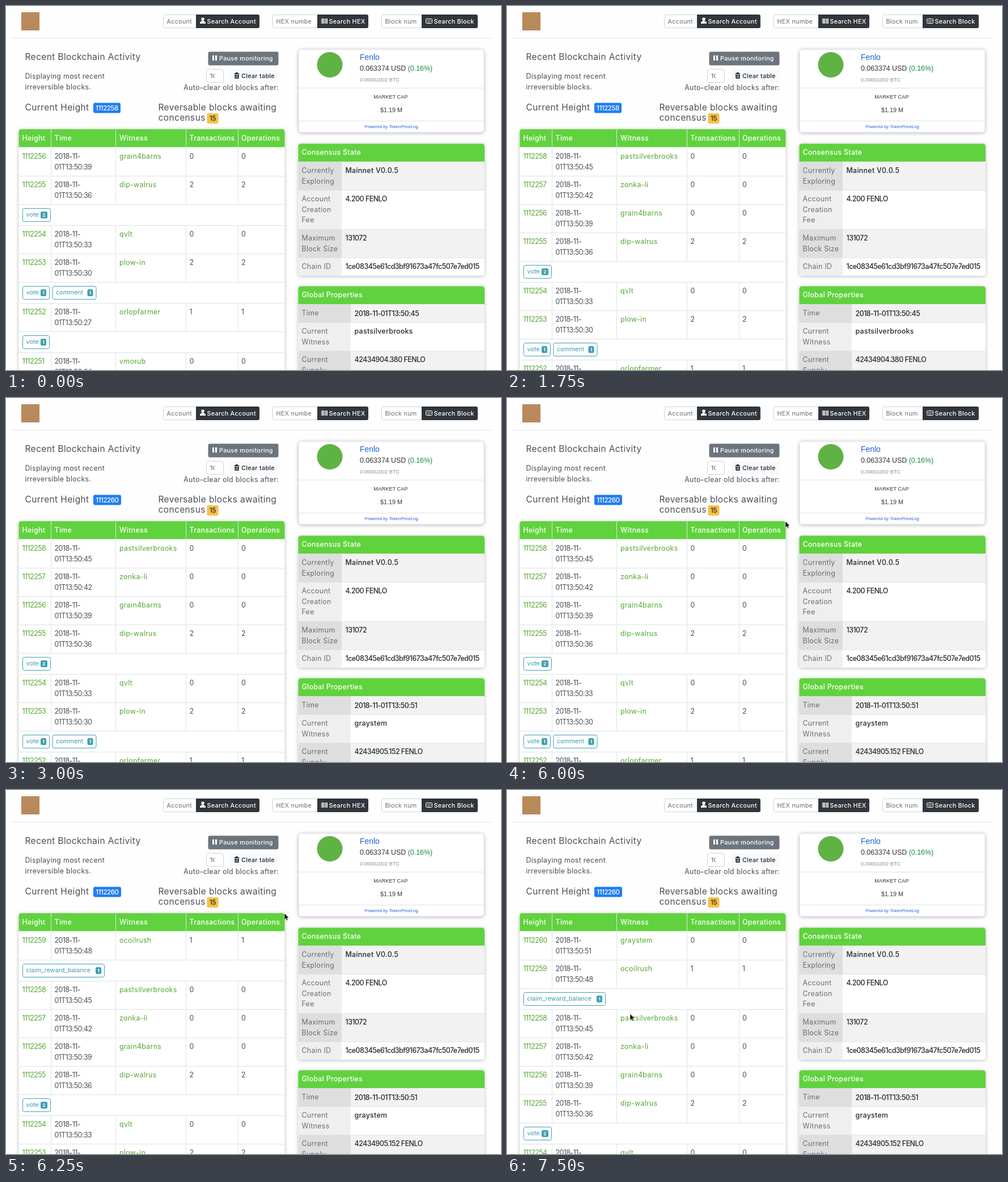
Animation of 873x641 px, one loop 8 s. Source, as an HTML page:

```html
<!DOCTYPE html>
<html lang="en">
<head>
<meta charset="utf-8">
<title>Block explorer</title>
<style>
  html, body { margin: 0; width: 100%; height: 100%; overflow: hidden; background: #fefefe; }
  svg { display: block; }
  text { font: 12.4px Inter, sans-serif; letter-spacing: .024em; fill: #4a4f55; white-space: pre; }
  .h5 { font-size: 15.5px; }
  .small { font-size: 10.85px; }
  .badge { font-size: 11.6px; }
  .count { font-size: 8.2px; font-weight: 700; }
  .medium { font-weight: 500; }
  .number { letter-spacing: -.04em; }
  .white { fill: #fff; }
  .dark { fill: #24292e; }
  .muted { fill: #676e75; }
  .green { fill: #55a632; }
  .teal { fill: #3a9bb0; letter-spacing: 0; }
  .arial { font-family: "Liberation Sans", Arial, sans-serif; letter-spacing: 0; fill: #333; }
  .card { filter: drop-shadow(0 1px 3px #0004); }
</style>
</head>
<body>
<svg id="stage" width="873" height="641" viewBox="0 0 873 641">
  <clipPath id="inCard"><path d="M515 240H844V641H515z"/></clipPath>
  <clipPath id="inField"><path d="M356 112H367.5V134H356z"/></clipPath>
  <g id="page"></g>
  <g id="rows"></g>
  <g id="state"></g>
  <path id="cursor" d="M0 0V11.5L2.6 9.2 4.4 13 6.2 12.2 4.5 8.5H8z" stroke="#fff" stroke-width=".7"/>
</svg>
<script>
const GREEN = '#60d23e', LINE = '#dee2e6', TEAL = '#3f9fb3';
const COLUMNS = [28.5, 85.5, 200, 323.5, 415];
const $ = id => document.getElementById(id);

const text = (x, y, s, cls = '', extra = '') => `<text x="${x}" y="${y}" class="${cls}" ${extra}>${s}</text>`;
const centered = (x, y, s, cls, extra = '') => text(x, y, s, cls, `text-anchor="middle" ${extra}`);
const rect = (x, y, w, h, fill, r = 0, extra = '') =>
  `<rect x="${x}" y="${y}" width="${w}" height="${h}" rx="${r}" fill="${fill}" ${extra}/>`;
const outline = (x, y, w, h, stroke, r = 3) => rect(x + .5, y + .5, w - 1, h - 1, '#fff', r, `stroke="${stroke}"`);
const path = (d, fill, extra = '') => `<path d="${d}" fill="${fill}" ${extra}/>`;
const lines = d => path(d, 'none', `stroke="${LINE}"`);
const topRounded = (x, y, w, h, r = 5) =>
  path(`M${x} ${y + h}V${y + r}q0-${r} ${r}-${r}h${w - 2 * r}q${r} 0 ${r} ${r}V${y + h}z`, GREEN);

// Newest block first
const blocks = [
  ['graystem'], ['ocoilrush', ['claim_reward_balance', 1]], ['pastsilverbrooks'], ['zonka-li'],
  ['grain4barns'], ['dip-walrus', ['vote', 2]], ['qvlt'], ['plow-in', ['vote', 1], ['comment', 1]],
  ['orlopfarmer', ['vote', 1]], ['vmorub']
].map(([witness, ...ops], i) => ({
  height: 1112260 - i, time: `01T13:50:${51 - 3 * i}`, witness, ops,
  total: ops.reduce((sum, op) => sum + op[1], 0)
}));
const labelWidth = { vote: 24, comment: 54, claim_reward_balance: 121 };

function opTags(ops, y) {
  let x = 29, out = '';
  for (const [name, count] of ops) {
    const badgeX = x + 8 + labelWidth[name], badgeW = count > 1 ? 12 : 10, w = badgeX + badgeW + 6 - x;
    out += outline(x, y + 7, w, 24, TEAL) + text(x + 6.5, y + 22, name, 'small teal') +
      rect(badgeX, y + 13, badgeW, 12, TEAL, 2.5) + centered(badgeX + badgeW / 2, y + 22, count, 'count white');
    x += w + 4.5;
  }
  return out;
}

function blockRows(newest) {
  let y = 249, out = '';
  for (const b of blocks.filter(b => b.height <= newest)) {
    if (y > 641) break;
    const [height, time, witness, transactions, operations] = COLUMNS;
    out += text(height, y + 20, b.height, 'number green') + text(time, y + 20, '2018-11-', 'number') +
      text(time, y + 38.6, b.time, 'number') + text(witness, y + 20, b.witness, 'green') +
      text(transactions, y + 20, b.total) + text(operations, y + 20, b.total) +
      lines(`M79.5 ${y}v50M193.5 ${y}v50M317.5 ${y}v50M409.5 ${y}v50M23 ${y + 50.5}h468`);
    y += 50;
    if (b.ops.length) {
      out += opTags(b.ops, y) + lines(`M23 ${y + 37.5}h468`);
      y += 37;
    }
  }
  return out;
}

function searchBox(x, split, right, hint, label, textX, icon) {
  return outline(x, 15, split - x + 3, 24, '#ced4da') + text(x + 6.5, 31, hint, 'small muted') +
    path(`M${split} 15H${right - 3}q3 0 3 3V36q0 3-3 3H${split}z`, '#30363c') +
    text(textX, 31, label, 'small medium white') + icon;
}

const propertyValue = (x, y, value) => text(x, y, value, `medium dark ${/^\d/.test(value) ? 'number' : ''}`);

function propertyCard(y, title, split, rows) {
  const left = 515.5, width = 328.5, bottom = rows.at(-1).bottom;
  let top = y + 31.5;
  let out = rect(left, y, width, bottom - y, '#fff', 5, 'class="card"') + '<g clip-path="url(#inCard)">';
  rows.forEach(({ bottom: end, label, value = '' }, i) => {
    const odd = i % 2 == 0, last = i == rows.length - 1, h = end - top;
    out += rect(left, top, split - left, h, odd ? '#dedede' : '#efefef', last ? 5 : 0) +
      rect(split, top, 844 - split, h, odd ? '#f2f2f2' : '#fff', last ? 5 : 0);
    if (i) out += lines(`M${left} ${top + .5}H844`);
    label.split('|').forEach((s, n) => out += text(521.5, top + 20 + 18.6 * n, s, 'muted'));
    out += propertyValue(split + 6.5, top + 20, value);
    top = end;
  });
  return out + '</g>' + topRounded(left, y, width, 31.5) + text(521.5, y + 19.5, title, 'medium white');
}

const userIcon = path('M342 31v-1.5q0-2 3.5-3v-1q-1.3-1-1.3-2.7 0-2.3 2.8-2.3t2.8 2.3q0 1.7-1.3 2.7v1q3.5 1 3.5 3v1.5z', '#fff');
const barsIcon = path('M556 22h1v9h-1zM558 22h2v9h-2zM561 22h1v9h-1zM563 22h1.5v9h-1.5zM565.5 22h1.5v9h-1.5z', '#fff');
const keyboardIcon = rect(740.5, 22.5, 11, 8, 'none', 1, 'stroke="#fff"') +
  path('M742 25h8.5M742 27h8.5M743.5 29h5', 'none', 'stroke="#fff" stroke-dasharray="1.2 .8"');
const trashIcon = path('M402.5 118.5h2.5v-1.5h4v1.5h2.5v1.5h-9zM403 121h8l-.6 7h-6.8z', '#24292e') +
  path('M405.5 122v5M407 122v5M408.5 122v5', 'none', 'stroke="#fff" stroke-width=".6"');

const header = rect(27, 11, 32, 32, '#b88a5c') + lines('M11 56.5H856') +
  searchBox(277, 335, 447, 'Account', 'Search Account', 354.5, userIcon) +
  searchBox(470, 549, 639, 'HEX numbe', 'Search HEX', 569.5, barsIcon) +
  searchBox(662, 733, 832, 'Block num', 'Search Block', 754.5, keyboardIcon);

const activity = text(33.5, 95, 'Recent Blockchain Activity', 'h5') +
  text(33.5, 128, 'Displaying most recent') + text(33.5, 146.5, 'irreversible blocks.') +
  rect(356.5, 80.5, 124, 24, '#6c757d', 3) + path('M364 87h3v9h-3zM369 87h3v9h-3z', '#fff') +
  text(376, 96, 'Pause monitoring', 'small medium white') +
  outline(353, 111, 31, 24, '#ced4da') + text(360, 127, '10', 'small', 'clip-path="url(#inField)"') +
  rect(395, 111, 85, 24, '#f8f9fa', 3) + trashIcon + text(415, 127, 'Clear table', 'small medium dark') +
  text(481, 148, 'Auto-clear old blocks after:', '', 'text-anchor="end"') +
  text(33.5, 184, 'Current Height', 'h5') + text(268.5, 184, 'Reversable blocks awaiting', 'h5') +
  text(268.5, 202, 'concensus', 'h5') +
  rect(354.5, 189, 20, 18, '#f7c144', 3) + centered(364.5, 202, '15', 'badge number medium dark') +
  rect(22.5, 217, 469, 450, '#fff', 5, 'class="card"') + topRounded(22.5, 217, 469, 31.5) +
  lines('M79.5 217v32M193.5 217v32M317.5 217v32M409.5 217v32') +
  ['Height', 'Time', 'Witness', 'Transactions', 'Operations'].map((s, i) => text(COLUMNS[i], 237, s, 'medium white')).join('');

const arial = (size, fill = '#333') => `style="font-size:${size}px;fill:${fill}"`;
const market = rect(516, 76.5, 327, 146, '#fff', 5, `class="card" stroke="${LINE}"`) +
  lines('M516 144.5H843M516 202.5H843') + '<circle cx="571" cy="103.5" r="22.5" fill="#5fb244"/>' +
  text(624, 95, 'Fenlo', 'arial', arial(13.95, '#1f62d0')) +
  text(624, 114, '0.063374 USD <tspan fill="#1c8a4c">(0.16%)</tspan>', 'arial', arial(12.4)) +
  text(624, 133, '0.00001002 BTC', 'arial', arial(9.3, '#8a8a8a')) +
  centered(678.5, 163, 'MARKET CAP', 'arial', arial(9.3)) + centered(679.5, 187, '$1.19 M', 'arial', arial(10.85)) +
  centered(679.5, 215, 'Powered by TokenPriceLog', 'arial', 'style="font-size:7.75px;font-style:italic;fill:#1a5fd4"');

$('page').innerHTML = header + activity + market +
  propertyCard(242.5, 'Consensus State', 592, [
    { bottom: 324, label: 'Currently|Exploring', value: 'Mainnet V0.0.5' },
    { bottom: 393, label: 'Account|Creation|Fee', value: '4.200 FENLO' },
    { bottom: 443, label: 'Maximum|Block Size', value: '131072' },
    { bottom: 475, label: 'Chain ID', value: '1ce08345e61cd3bf91673a47fc507e7ed015' }
  ]) +
  propertyCard(493.5, 'Global Properties', 608, [
    { bottom: 557, label: 'Time' },
    { bottom: 607, label: 'Current|Witness' },
    { bottom: 660, label: 'Current|Supply' }
  ]);

function chainState(height) {
  const [time, witness, supply] = height == 1112260
    ? ['51', blocks[0].witness, '42434905.152'] : ['45', blocks[2].witness, '42434904.380'];
  const w = height == 1112260 ? 49 : 48;
  return rect(154, 170.5, w, 18, '#1f7df5', 3) + centered(154 + w / 2, 183.5, height, 'badge number medium white') +
    propertyValue(614.5, 546, `2018-11-01T13:50:${time}`) + propertyValue(614.5, 577, witness) +
    propertyValue(614.5, 627, `${supply} FENLO`);
}

// [start ms, newest listed block]
const arrivals = [[0, 1112256], [500, 1112257], [1750, 1112258], [6250, 1112259], [7500, 1112260]];
// Pointer position for each 250 ms step from 5500 ms
const pointer = [[631, 4], [509, 183], [491, 217], [491, 217], [484, 223], [348, 313], [345, 313], [269, 356], [217, 394], [217, 394]];

let shownRows, shownHeight;
function draw(now) {
  const t = now % 8000;
  const newest = arrivals.findLast(([start]) => t >= start)[1];
  const height = t < 3000 ? 1112258 : 1112260;
  if (newest != shownRows) $('rows').innerHTML = blockRows(shownRows = newest);
  if (height != shownHeight) $('state').innerHTML = chainState(shownHeight = height);
  const spot = pointer[Math.floor((t - 5500) / 250)];
  $('cursor').setAttribute('transform', `translate(${spot || [-50, -50]})`);
  requestAnimationFrame(() => draw(performance.now()));
}
draw(performance.now());
</script>
</body>
</html>
```
